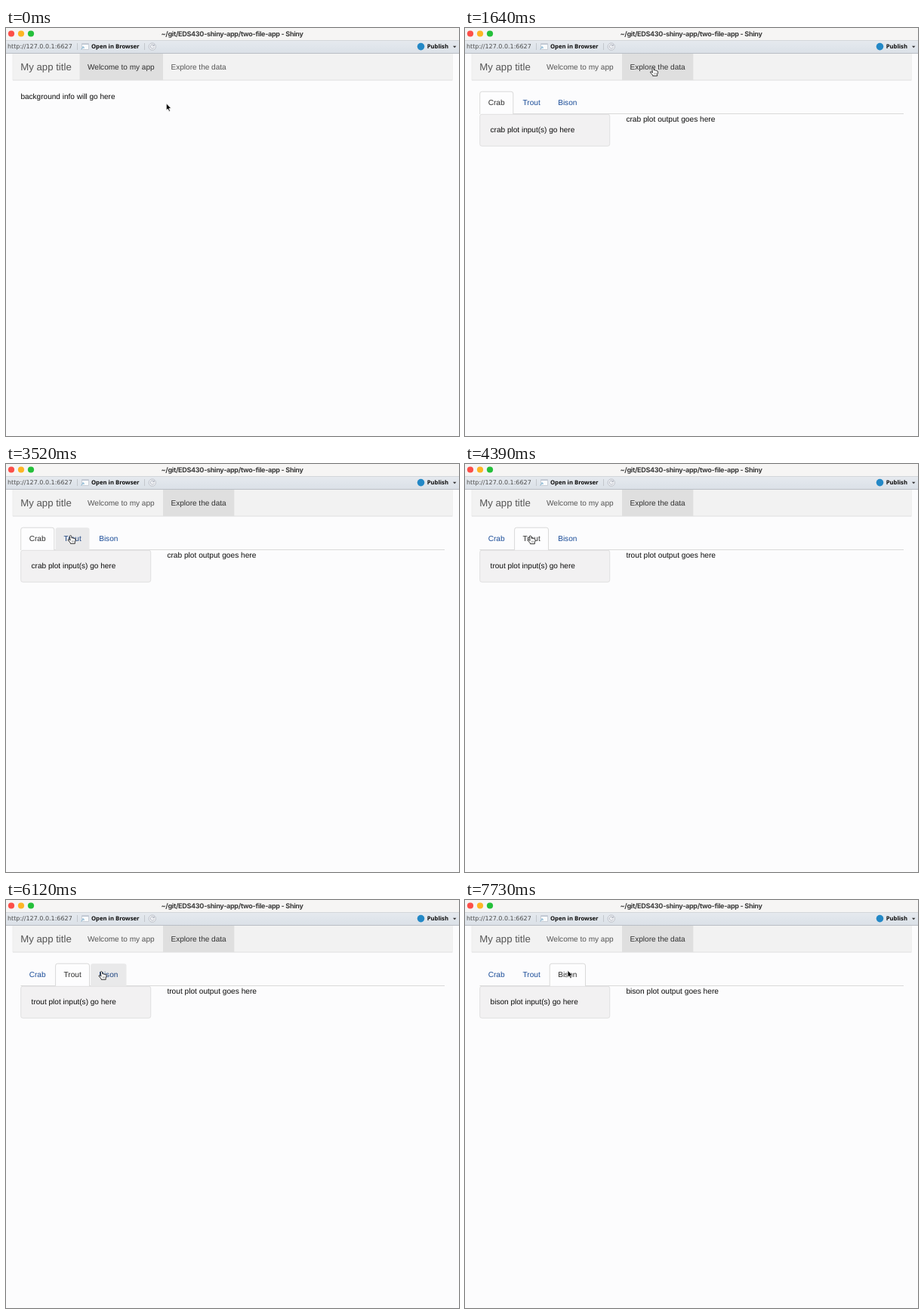
An HTML page that plays this animation: 600x540 px, repeating every 8360 ms.

```html
<!DOCTYPE html>
<html lang="en">
<head>
<meta charset="utf-8">
<title>Tabbed app</title>
<style>
  html, body { margin: 0; width: 100%; height: 100%; overflow: hidden; background: #fcfcfd; }
  svg { display: block; width: 600px; height: 540px; text-rendering: geometricPrecision; }
  text { font: 10.05px "Liberation Sans", Arial, sans-serif; fill: #0c0c0c; white-space: pre; }
  #output { font-size: 10.17px; }
  .window-title { font: 700 9px Inter, sans-serif; letter-spacing: -.3px; fill: #3b3b3b; text-anchor: middle; }
  .address { font: 8px "DejaVu Sans", sans-serif; fill: #4c4c4c; }
  .tool { font: 700 7.7px "Open Sans", sans-serif; fill: #0c0c0c; }
  .brand { font-size: 13.2px; fill: #555; }
  .nav text { fill: #555; }
  .nav rect { fill: none; }
  .nav.hover text { fill: #1a1a1a; }
  .nav.active text { fill: #303030; }
  .nav.active rect { fill: #dfdfdf; }
  .tab text { fill: #1a4c98; }
  .tab path { fill: none; stroke: none; }
  .tab.hover path { fill: #e9e9ea; }
  .tab.hover text { fill: #1d4480; }
  .tab.active path { fill: #fdfdfe; stroke: #d9d9d9; }
  .tab.active text { fill: #2c2c2c; }
</style>
</head>
<body>
<svg viewBox="0 0 600 540">
  <defs>
    <linearGradient id="toolbar" x2="0" y2="1">
      <stop stop-color="#e6eaef"/><stop offset="1" stop-color="#dae0e7"/>
    </linearGradient>
  </defs>
  <rect width="600" height="540" fill="#fcfcfd"/>

  <rect width="600" height="16" fill="#f6f5f4"/>
  <circle cx="7" cy="7.5" r="4.1" fill="#fc4f49"/>
  <circle cx="20" cy="7.5" r="4.1" fill="#fdb524"/>
  <circle cx="33" cy="7.5" r="4.1" fill="#25c03a"/>
  <text class="window-title" x="299.5" y="10.6">~/git/EDS430-shiny-app/two-file-app - Shiny</text>

  <rect y="16" width="600" height="18" fill="url(#toolbar)"/>
  <path d="M0 16.5H600" stroke="#d3d6da"/>
  <path d="M0 33.5H600" stroke="#b9bec5"/>
  <path d="M94.5 20V29M183.5 20V29" stroke="#c3c7cc"/>
  <text class="address" x="2" y="27.2">http://127.0.0.1:6627</text>
  <path d="M100.5 20.5H109.5V28.5H100.5Z" fill="#fafbfc" stroke="#c0c6ce" stroke-width=".8"/>
  <path d="M100.5 21.5H109.5" stroke="#b9c3d0"/>
  <path d="M99.4 28.3L102.6 25.4M100.8 25H103V27.2" fill="none" stroke="#7fb2d0"/>
  <text class="tool" x="113" y="27.2">Open in Browser</text>
  <circle cx="193.8" cy="24.6" r="4.7" fill="#eef0f3" stroke="#bfc3cb"/>
  <path d="M196 23A2.6 2.6 0 1 0 196.3 25.5M196.4 21.5V23.6H194.2" fill="none" stroke="#b1b6c1" stroke-width=".9"/>
  <circle cx="549.5" cy="24.6" r="4.8" fill="#2388c6"/>
  <text class="tool" x="557.7" y="27.2">Publish</text>
  <path d="M592 23.8H596.4L594.2 26.3Z" fill="#333"/>

  <rect x="9" y="34" width="582.5" height="35" fill="#f2f2f2"/>
  <path d="M9 69H591.5" stroke="#dedede"/>
  <path d="M8.8 34V69M591.5 34V69" stroke="#ededed" stroke-width=".7"/>
  <text class="brand" x="19.3" y="56">My app title</text>
  <g id="navs"></g>

  <text id="intro" x="19.4" y="94.2">background info will go here</text>
  <g id="explore">
    <path d="M19.5 113.5H581" stroke="#d9d9d9"/>
    <g id="tabs"></g>
    <rect x="19.7" y="114.3" width="172" height="41.9" rx="2.5" fill="#f2f1f2" stroke="#e0e0e0"/>
    <text id="input" x="33.6" y="138.4"></text>
    <text id="output" x="213.4" y="124.4"></text>
  </g>

  <g id="cursor">
    <path id="arrow" d="M0 0V9.2L2.1 7.3L3.6 10.6L5.2 9.9L3.7 6.7H6.6Z" fill="#000" stroke="#fff" stroke-width=".8" stroke-linejoin="round"/>
    <path id="hand" d="M-1.1 .9Q0 -.5 1.1 .9L1.6 3.7Q2.9 3 3.6 4Q4.9 3.5 5.4 4.6Q6.7 4.5 6.7 6Q6.7 8 5.8 9V11H-.2V10L-3.2 6.7Q-3.6 5.2 -2.2 5.5L-.4 6.8Z" fill="#fff" stroke="#1a1a1a" stroke-width=".9" stroke-linejoin="round"/>
    <path id="creases" d="M1.9 7V9.2M3.3 7V9.2M4.7 7V9.2" stroke="#555" stroke-width=".5"/>
  </g>
</svg>
<script>
const LOOP = 8360;
const CLICK = { explore: 1120, trout: 4270, bison: 7360 };
const $ = id => document.getElementById(id);

// Cursor path: time, x, y of the hot spot
const path = [
  [90, 212.3, 99.8], [220, 218, 90], [360, 234, 67], [480, 246, 53], [600, 248.5, 51.5],
  [910, 248.5, 51.5], [940, 248.8, 52.3], [2300, 248.8, 52.3], [2450, 240, 56],
  [2670, 209.5, 69.3], [2900, 152, 87], [3130, 106, 96], [3330, 88, 94.5],
  [3520, 85.5, 94.3], [4200, 86.5, 94.7], [5270, 86.5, 94.7], [5420, 89.8, 94.2],
  [5640, 103, 94], [5880, 119, 94.2], [6120, 126.3, 94.3], [6380, 136, 93.2]
];

// Times at which the pointer shows a hand
const handTimes = [[360, 2700], [3190, 4940], [5860, 7730]];

function addItem(parent, shape, label, x, y) {
  $(parent).insertAdjacentHTML("beforeend",
    `<g>${shape}<text x="${x}" y="${y}">${label}</text></g>`);
  return $(parent).lastElementChild;
}

const navs = [["Welcome to my app", 97.5, 208], ["Explore the data", 208, 302.3]].map(
  ([label, left, right]) => addItem("navs",
    `<rect x="${left}" y="34" width="${right - left}" height="35"/>`, label, left + 10.5, 55));

const tabs = [["Crab", 19.7, 63.8], ["Trout", 65.6, 110.5], ["Bison", 112.2, 159.5]].map(
  ([label, left, right]) => ({
    name: label.toLowerCase(), left, right,
    node: addItem("tabs", `<path d="M${left} 114V87Q${left} 84.2 ${left + 2.8} 84.2H${right - 2.8}Q${right} 84.2 ${right} 87V114"/>`,
      label, left + 11, 102.2)
  }));

function cursorAt(t) {
  const next = path.findIndex(point => point[0] > t);
  if (next === 0) return path[0].slice(1);
  if (next < 0) return path[path.length - 1].slice(1);
  const [t0, x0, y0] = path[next - 1], [t1, x1, y1] = path[next];
  const k = (t - t0) / (t1 - t0);
  return [x0 + (x1 - x0) * k, y0 + (y1 - y0) * k];
}

function setState(node, kind, active, hover) {
  node.setAttribute("class", `${kind} ${active ? "active" : hover ? "hover" : ""}`);
}

const show = (id, visible) => $(id).setAttribute("visibility", visible ? "visible" : "hidden");

function draw(t) {
  const [x, y] = cursorAt(t);
  const exploring = t >= CLICK.explore;
  const current = t >= CLICK.bison ? 2 : t >= CLICK.trout ? 1 : 0;

  setState(navs[0], "nav", !exploring, false);
  setState(navs[1], "nav", exploring, x > 208 && y < 69);
  $("intro").style.display = exploring ? "none" : "";
  $("explore").style.display = exploring ? "" : "none";

  tabs.forEach((tab, i) => setState(tab.node, "tab", i === current,
    x > tab.left && x < tab.right && y > 84 && y < 113));
  $("input").textContent = `${tabs[current].name} plot input(s) go here`;
  $("output").textContent = `${tabs[current].name} plot output goes here`;

  const pointing = handTimes.some(([from, to]) => t >= from && t < to);
  show("arrow", !pointing);
  show("hand", pointing);
  show("creases", pointing);
  $("cursor").setAttribute("transform", `translate(${x} ${y})`);
}

const start = performance.now();
function tick() {
  draw((performance.now() - start) % LOOP);
  requestAnimationFrame(tick);
}
tick();
</script>
</body>
</html>
```
